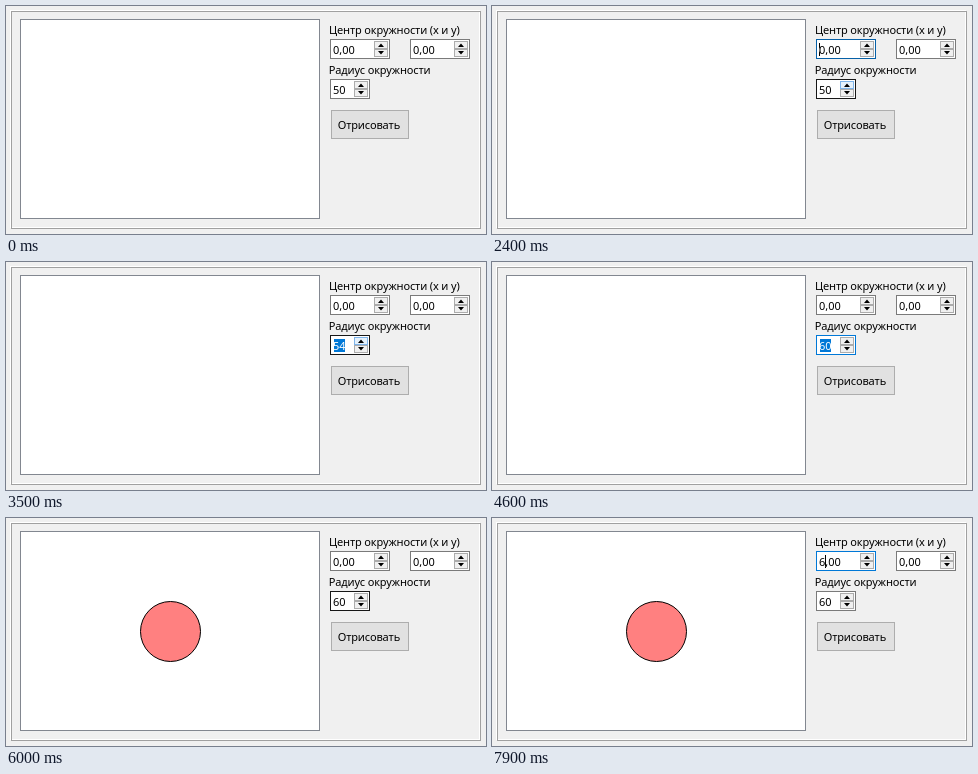
These frames come from a looping animation (480 by 228 pixels, 8000 ms). An HTML page:

```html
<!DOCTYPE html>
<html lang="ru">
<head>
<meta charset="utf-8">
<style>
  html, body { margin: 0; width: 100%; height: 100%; overflow: hidden; background: #f0f0f0; }
  svg { display: block; width: 100%; height: 100%; font: 11px "Noto Sans", "Open Sans", sans-serif; }
  rect { shape-rendering: crispEdges; }
  text { white-space: pre; }
  .label { letter-spacing: -.15px; }
  .caret { fill: #fff; mix-blend-mode: difference; }
</style>
</head>
<body>
<svg id="stage" viewBox="0 0 480 228"></svg>
<script>
const LOOP = 8000;
const GREY = '#7a7a7a', MID = '#484848', DARK = '#171717', BLUE = '#0078d7', DEEP = '#0c4877';
const stage = document.getElementById('stage');

function add(tag, attrs, text) {
  const el = document.createElementNS('http://www.w3.org/2000/svg', tag);
  set(el, attrs);
  if (text) el.textContent = text;
  return stage.appendChild(el);
}
function set(el, attrs) {
  for (const k in attrs) el.setAttribute(k, attrs[k]);
}
// One-pixel outlined box with integer outer bounds
function box(x, y, w, h, fill, stroke) {
  return add('rect', { x: x + .5, y: y + .5, width: w - 1, height: h - 1, fill, stroke });
}
function spin(x, y, w, value) {
  const frame = box(x, y, w, 20, '#fff', GREY);
  const bx = x + w - 16, mid = bx + 7;
  const up = box(bx, y + 2, 14, 8, '#f0f0f0', '#acacac');
  box(bx, y + 10, 14, 8, '#f0f0f0', '#acacac');
  add('path', { d: `M${mid - 3} ${y + 8}h6l-3-3.4zM${mid - 3} ${y + 12}h6l-3 3.4z` });
  const mark = add('rect', { x: x + 4, y: y + 4, height: 13, width: 0, fill: BLUE });
  const text = add('text', { x: x + 2.9, y: y + 15 });
  const first = add('tspan', {}), rest = add('tspan', {});
  text.append(first, rest);
  const caret = add('rect', { class: 'caret', x: x + 3, y: y + 4, width: 1, height: 13, visibility: 'hidden' });
  first.textContent = value.slice(0, -3) || value;
  rest.textContent = value.length > 2 ? value.slice(-3) : '';
  return { frame, up, mark, first, caret };
}
function select(field, width) {
  set(field.mark, { width });
  set(field.first, { fill: width ? '#fff' : '#000' });
}

// Raised etched frame
box(4, 4, 470, 218, 'none', '#fff');
box(5, 5, 470, 218, 'none', '#a0a0a0');
box(14, 13, 300, 200, '#fff', '#828790');
const circle = add('circle', { cx: 164.5, cy: 113.5, r: 30, fill: '#ff8080', stroke: '#000' });
add('text', { class: 'label', x: 323, y: 28 }, 'Центр окружности (x и y)');
add('text', { class: 'label', x: 322.7, y: 68 }, 'Радиус окружности');
const xField = spin(324, 33, 60, '0,00');
spin(404, 33, 60, '0,00');
const rField = spin(324, 73, 40, '50');
const button = box(325, 104, 78, 29, '#e1e1e1', '#adadad');
add('text', { class: 'label', x: 362.9, y: 123, 'text-anchor': 'middle' }, 'Отрисовать');

// Step tracks: [start time, value]
const xBorder = [[0, GREY], [300, MID], [400, DARK], [2200, '#11305a'], [2300, DEEP], [2400, '#0660a7'], [2500, BLUE],
  [3000, '#3d79a8'], [3100, GREY], [6300, MID], [6400, DARK],
  [7100, '#11305a'], [7200, DEEP], [7300, '#0660a7'], [7400, BLUE]];
const xCaret = [[0, 0], [1100, 327], [1500, 0], [2000, 327], [2500, 0],
  [6700, 333], [6800, 327], [7300, 0], [7700, 327], [7900, 333]];
const xSelect = [[0, 0], [6800, 5], [7900, 0]];
const rBorder = [[0, GREY], [2300, MID], [2400, DARK], [4500, DEEP], [4600, BLUE],
  [5300, '#3d79a8'], [5400, GREY], [5900, MID], [6000, DARK], [6100, MID], [6200, GREY]];
const rSelect = [[0, 0], [3000, 11], [5200, 0]];
const counts = [3200, 3300, 3400, 3500, 3600, 3700, 3900, 4000, 4100, 4300];
const arrow = [[0, ['#f0f0f0', '#acacac']], [2400, ['#e5f1fb', '#7eb4ea']], [4500, ['#f0f0f0', '#acacac']]];
const buttonLook = [[0, ['#e1e1e1', '#adadad']], [4800, ['#e3e9ee', '#5793c2']], [4900, ['#e5f1fb', BLUE]],
  [5300, ['#cce4f7', '#005499']], [5500, ['#e5f1fb', BLUE]],
  [5900, ['#e3e9ee', '#5793c2']], [6000, ['#e1e1e1', '#adadad']]];

const at = (track, t) => track.findLast(step => step[0] <= t)[1];
function paint(el, [fill, stroke]) { set(el, { fill, stroke }); }

function draw(now) {
  const t = now % LOOP;
  set(xField.frame, { stroke: at(xBorder, t) });
  set(rField.frame, { stroke: at(rBorder, t) });
  paint(rField.up, at(arrow, t));
  paint(button, at(buttonLook, t));

  xField.first.textContent = t < 7900 ? '0' : '6';
  select(xField, at(xSelect, t));
  const caret = at(xCaret, t);
  set(xField.caret, { x: caret, visibility: caret ? 'visible' : 'hidden' });

  rField.first.textContent = 50 + counts.filter(c => c <= t).length;
  select(rField, at(rSelect, t));
  set(circle, { visibility: t < 5400 ? 'hidden' : 'visible' });
  requestAnimationFrame(draw);
}
draw(performance.now());
</script>
</body>
</html>
```
